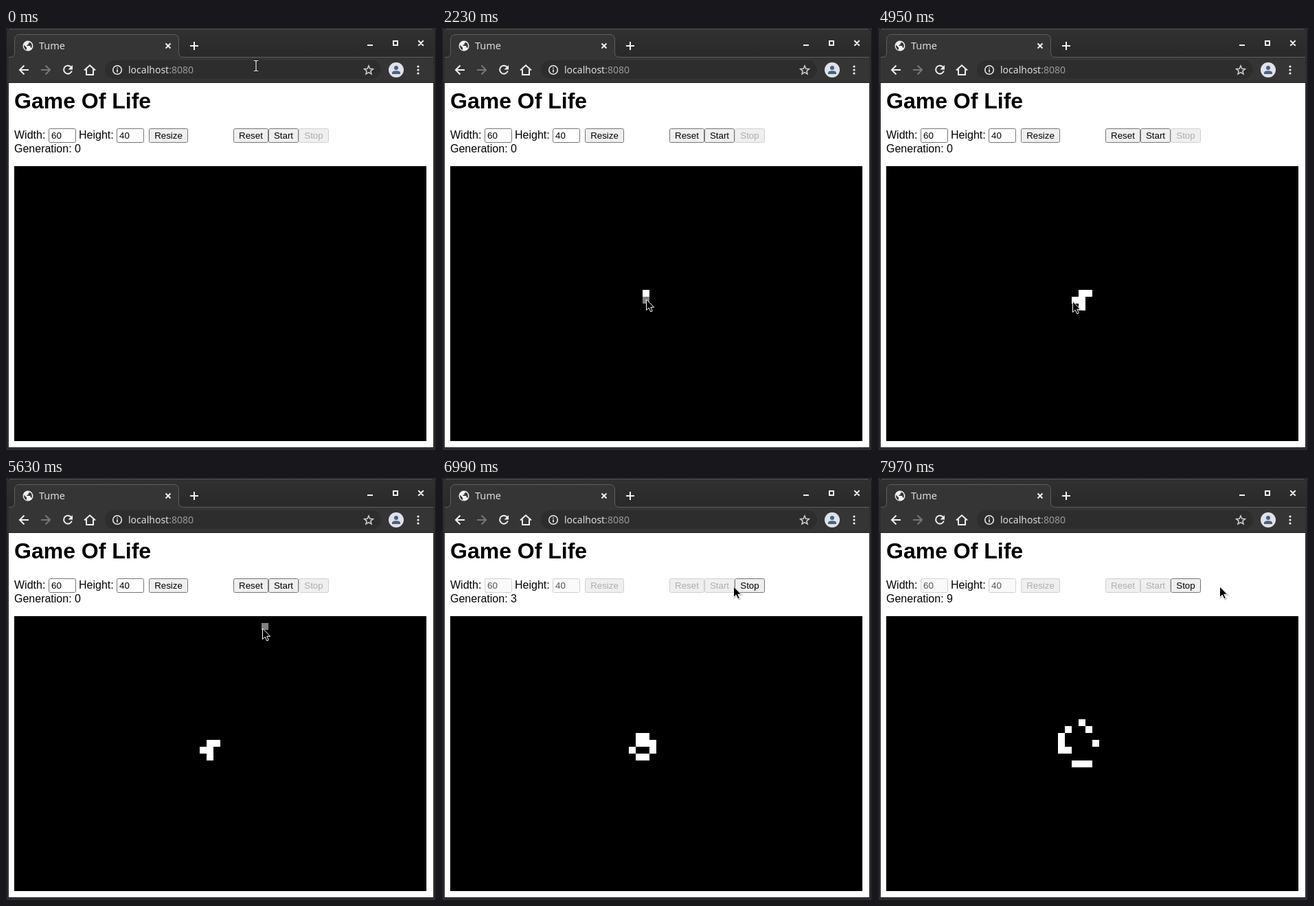
Write an HTML page that moves like this. It is 626x614 px and loops after 8000 ms.

```html
<!DOCTYPE html>
<html lang="en">
<head>
<meta charset="utf-8">
<title>Game Of Life</title>
<style>
  html, body { margin: 0; width: 100%; height: 100%; overflow: hidden; background: #2d2d2d; }
  svg { display: block; }
  .page { font-family: "Liberation Sans", Arial, sans-serif; font-size: 16px; }
  .control { font-size: 13.333px; }
  .chrome { font-family: "Noto Sans", "Open Sans", sans-serif; font-size: 14px; }
  .line { fill: none; stroke: #f1f1f1; stroke-width: 2; }
</style>
</head>
<body>
<svg id="stage" width="626" height="614" viewBox="0 0 626 614">
  <defs>
    <linearGradient id="bar" x2="0" y2="1">
      <stop offset="0" stop-color="#313131"/><stop offset="1" stop-color="#292929"/>
    </linearGradient>
  </defs>

  <g class="chrome">
    <rect width="626" height="614" fill="#2d2d2d"/>
    <path d="M.5 614V8Q.5 .5 8 .5H618Q625.5 .5 625.5 8V614" fill="none" stroke="#171717"/>
    <rect x="2" y="2" width="622" height="40" fill="url(#bar)"/>
    <path d="M5 1.5H621" stroke="#595959"/>
    <rect x="4" y="42" width="618" height="38" fill="#353535"/>
    <path d="M4 42.5H6Q12.5 42.5 12.5 36V17Q12.5 9.5 20 9.5H244Q251.5 9.5 251.5 17V36Q251.5 42.5 259 42.5H622V46H4Z" fill="#353535"/>
    <path d="M4 42.5H6Q12.5 42.5 12.5 36V17Q12.5 9.5 20 9.5H244Q251.5 9.5 251.5 17V36Q251.5 42.5 259 42.5H622" fill="none" stroke="#5e5e5e"/>
    <path d="M4 79.5H622" stroke="#1c1c1c"/>

    <circle cx="32" cy="26" r="7.5" fill="#f1f1f1"/>
    <path d="M26 24.5L30 28.5V32Q25.5 30.5 26 24.5ZM33.5 20L37 22.5Q38.5 26 37.5 29L35.5 28V26H30.5V24.5H32.5V22H34Z" fill="#353535"/>
    <text x="48" y="31" font-size="14.5" fill="#dadada">Tume</text>
    <path class="line" stroke-width="1.8" d="M232.5 22.5L239.5 29.5M239.5 22.5L232.5 29.5"/>
    <path class="line" d="M268 26H280M274 20V32"/>
    <path class="line" d="M526 25H534M564 19H570V25H564ZM600.3 18.3L607.7 25.7M607.7 18.3L600.3 25.7"/>

    <path class="line" d="M33 61H20.5M26.5 54.5L20 61L26.5 67.5"/>
    <path class="line" style="stroke:#777" d="M51 61H63.5M57.5 54.5L64 61L57.5 67.5"/>
    <path class="line" d="M95.2 57.5A6 6 0 1 0 95.8 62.5"/>
    <path d="M97 54V60.5H90.5Z" fill="#f1f1f1"/>
    <path class="line" d="M114 61.5L122 54.3L130 61.5M117 60V68H127V60"/>
    <rect x="144" y="47" width="402" height="27" rx="13.5" fill="#2d2d2d"/>
    <circle class="line" style="stroke-width:1.5" cx="162" cy="61" r="6.3"/>
    <path class="line" style="stroke-width:1.6" d="M162 57.4V59M162 60.3V64.6"/>
    <text x="178" y="66" fill="#dedede">localhost<tspan fill="#9a9a9a">:8080</tspan></text>
    <path class="line" style="stroke:#d0d0d0;stroke-width:1.5" d="M528 55L529.8 59.2L534.4 59.6L530.9 62.6L532 67L528 64.7L524 67L525.1 62.6L521.6 59.6L526.2 59.2Z"/>
    <circle cx="568" cy="61" r="11" fill="#dee3e9"/>
    <circle cx="568" cy="58" r="3" fill="#4d5f7e"/>
    <path d="M562 67V65.5Q562 62.3 568 62.3T574 65.5V67Z" fill="#4d5f7e"/>
    <g fill="#f1f1f1"><circle cx="600" cy="56" r="1.6"/><circle cx="600" cy="61" r="1.6"/><circle cx="600" cy="66" r="1.6"/></g>
  </g>

  <g class="page">
    <rect x="4" y="80" width="618" height="530" fill="#fff"/>
    <text x="12" y="117" font-size="32" font-weight="bold">Game Of Life</text>
    <text x="12" y="161">Width:</text>
    <text x="106" y="161">Height:</text>
    <text id="generation" x="12" y="181"></text>
    <g id="controls" class="control"></g>
    <rect x="12" y="201" width="600" height="400"/>
    <rect id="hover" width="10" height="10" fill="#808080"/>
    <path id="cells" fill="#fff" shape-rendering="crispEdges"/>
  </g>

  <g id="arrow">
    <path d="M.5 .9V16.6L4.2 13.2L6.8 18.9L9.3 17.8L6.8 12.3H11.6Z" transform="translate(1 1)" fill="#000" stroke="#000" stroke-width="1.5" opacity=".2"/>
    <path d="M.5 .9V16.6L4.2 13.2L6.8 18.9L9.3 17.8L6.8 12.3H11.6Z" fill="#000" stroke="#fff"/>
  </g>
  <g id="beam" fill="none">
    <path d="M360 47.5H363L364 48.5L365 47.5H368M364 48V62M360 62.5H363L364 61.5L365 62.5H368" stroke="#111" stroke-width="3"/>
    <path d="M360.5 47.5H363L364 48.5L365 47.5H367.5M364 48V62M360.5 62.5H363L364 61.5L365 62.5H367.5" stroke="#fff" stroke-width="1.2"/>
  </g>
</svg>

<script>
const LOOP = 8000, CELL = 10, LEFT = 12, TOP = 201;
const PRESS = 6320, RUN = 6390;
const byId = id => document.getElementById(id);

// Pointer moves: first step, last step, number of steps, destination
const moves = [
  [200, 485, 4, 311, 385], [580, 770, 3, 320, 412],
  [1060, 1440, 5, 299, 387], [1925, 2020, 2, 299, 392],
  [2230, 2230, 1, 297, 394], [2320, 2320, 1, 297, 396],
  [2720, 2720, 1, 298, 401], [2910, 3010, 2, 297, 405],
  [3285, 3590, 4, 308, 380], [4075, 4270, 3, 283, 397],
  [5160, 5910, 9, 404, 155], [6880, 6990, 2, 424, 157],
  [7070, 7560, 6, 497, 157]
];

// Cell clicks: time, column, row
const clicks = [[1830, 28, 18], [2510, 28, 19], [3190, 28, 20], [3980, 29, 18], [4950, 27, 19]];
const ticks = [6480, 6700, 6880, 7070, 7266, 7364, 7560, 7760, 7970];

const key = (x, y) => x + y * 60;

function nextGeneration(alive) {
  const counts = new Map();
  for (const k of alive)
    for (const d of [-61, -60, -59, -1, 1, 59, 60, 61])
      counts.set(k + d, (counts.get(k + d) || 0) + 1);
  return [...counts].filter(([k, n]) => n === 3 || n === 2 && alive.includes(k)).map(([k]) => k);
}

const generations = [clicks.map(([, x, y]) => key(x, y))];
ticks.forEach((_, i) => generations.push(nextGeneration(generations[i])));

function makeControl(label, x, width, textX, isInput) {
  const group = document.createElementNS("http://www.w3.org/2000/svg", "g");
  group.innerHTML = `<rect x="${x + .5}" y="146.5" width="${width - 1}" height="20" rx="2"/>` +
    `<text x="${textX}" y="161"${isInput ? "" : ' text-anchor="middle"'}>${label}</text>`;
  byId("controls").append(group);
  return { x, width, isInput, label, box: group.firstChild, text: group.lastChild };
}

const makeButton = (label, x, width) => makeControl(label, x, width, x + width / 2, false);
const controls = [
  makeControl("60", 62, 40, 66, true),
  makeControl("40", 161, 40, 165, true),
  makeButton("Resize", 208, 57),
  makeButton("Reset", 331, 51),
  makeButton("Start", 382, 44),
  makeButton("Stop", 426, 44)
];

function styleControl(control, t, pointer) {
  const { x, width, isInput, label, box, text } = control;
  const disabled = (label === "Stop") === (t < RUN);
  const over = !isInput && !disabled && pointer.x >= x && pointer.x < x + width &&
    pointer.y >= 146 && pointer.y < 167;
  const pressed = over && t >= PRESS && t < RUN;
  let fill = isInput ? "#fff" : "#efefef", stroke = "#767676", ink = "#000";
  if (disabled) {
    fill = isInput ? "#fafafa" : "#efefef";
    stroke = "#d0d0d0";
    ink = isInput ? "#545454" : "#adadad";
  } else if (pressed) {
    fill = "#f5f5f5";
    stroke = "#8d8d8d";
  } else if (over) {
    fill = "#e5e5e5";
    stroke = "#4f4f4f";
  }
  box.setAttribute("fill", fill);
  box.setAttribute("stroke", stroke);
  text.setAttribute("fill", ink);
}

function pointerAt(t) {
  let x = 364, y = 55;
  for (const [start, end, steps, toX, toY] of moves) {
    if (t < start) break;
    const gap = (end - start) / (steps - 1) || 1;
    const done = Math.min(steps, Math.floor((t - start) / gap + 1e-6) + 1);
    const p = done / steps, eased = p * p * (3 - 2 * p);
    x += (toX - x) * eased;
    y += (toY - y) * eased;
  }
  return { x: Math.round(x), y: Math.round(y) };
}

function render(t) {
  const pointer = pointerAt(t);
  const generation = ticks.filter(time => time <= t).length;
  const alive = generation ? generations[generation]
    : clicks.filter(([time]) => time <= t).map(([, x, y]) => key(x, y));

  byId("generation").textContent = "Generation: " + generation;
  byId("cells").setAttribute("d", alive.map(k =>
    `M${LEFT + k % 60 * CELL} ${TOP + Math.floor(k / 60) * CELL}h10v10h-10z`).join(""));

  const hover = byId("hover");
  hover.setAttribute("visibility", pointer.y >= TOP ? "visible" : "hidden");
  hover.setAttribute("x", LEFT + Math.floor((pointer.x - LEFT) / CELL) * CELL);
  hover.setAttribute("y", TOP + Math.floor((pointer.y - TOP) / CELL) * CELL);

  controls.forEach(control => styleControl(control, t, pointer));
  const typing = t < moves[0][0];
  byId("beam").setAttribute("visibility", typing ? "visible" : "hidden");
  byId("arrow").setAttribute("visibility", typing ? "hidden" : "visible");
  byId("arrow").setAttribute("transform", `translate(${pointer.x} ${pointer.y})`);
}

const startTime = performance.now();
function frame() {
  render((performance.now() - startTime) % LOOP);
  requestAnimationFrame(frame);
}
render(0);
requestAnimationFrame(frame);
</script>
</body>
</html>
```
